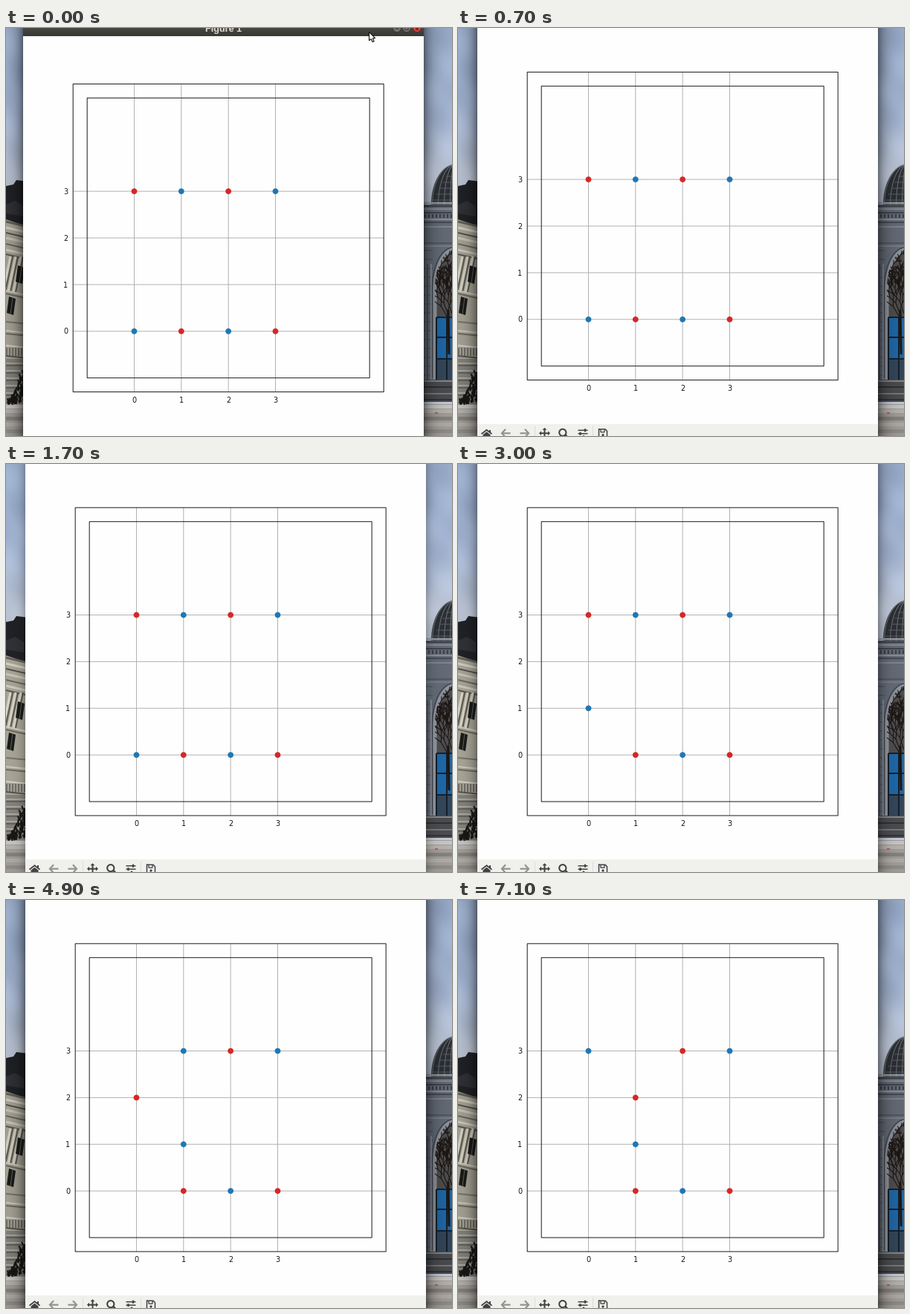
Recreate the animation shown at these times as a matplotlib script. Size 600x550 px, loop 8 s.

```python
import random

import numpy as np
import matplotlib.pyplot as plt
from matplotlib.animation import FuncAnimation
from matplotlib.collections import LineCollection
from matplotlib.patches import Circle, Polygon, Rectangle
from matplotlib.transforms import Affine2D

W, H, DPI = 600, 550, 100
STEP, LOOP = 100, 8000
PT = 72 / DPI
BLUE, RED = "#1f77b4", "#d62728"
X0, Y0, DX, DY = 175.5, 392.2, 63.33, 62.9
WIN_L, WIN_R = 26, 565

plt.rcParams["toolbar"] = "None"
fig = plt.figure(figsize=(W / DPI, H / DPI), dpi=DPI)
ax = fig.add_axes([0, 0, 1, 1])
ax.axis("off")
shift = Affine2D()
moving = shift + ax.transData


# ---- helpers -------------------------------------------------------------
def add(patch, z, win=False):
    patch.set_zorder(z)
    if win:
        patch.set_transform(moving)
    return ax.add_patch(patch)


def poly(pts, color, z=2, win=False):
    return add(Polygon(pts, fc=color, lw=0), z, win)


def rect(x, y, w, h, color, z=2, win=False):
    return add(Rectangle((x, y), w, h, fc=color, lw=0), z, win)


def stroke(pts, color, width=1.0, z=3, win=False):
    xs, ys = zip(*pts)
    line, = ax.plot(xs, ys, color=color, lw=width * PT, zorder=z,
                    solid_capstyle="butt", solid_joinstyle="miter", snap=False)
    if win:
        line.set_transform(moving)
    return line


def segments(lines, color, width):
    ax.add_collection(LineCollection(lines, colors=color, linewidths=width, zorder=4))


def label(x, y, s, size, **kw):
    return ax.text(x, y, s, fontsize=size * PT, va="baseline",
                   transform=moving, zorder=14, **kw)


def gx(u):
    return X0 + u * DX


def gy(v):
    return Y0 - v * DY


# ---- desktop picture -----------------------------------------------------
def sky():
    ys = np.arange(H)
    stops = [0, 60, 120, 200]
    cols = np.array([[156, 175, 205], [159, 178, 208], [168, 185, 214], [191, 200, 216]])
    grad = np.stack([np.interp(ys, stops, cols[:, c]) for c in range(3)], axis=1)
    xs = np.arange(W)[None, :]
    cloud = 5 * np.sin(ys[:, None] / 17 + xs / 14) + 3 * np.sin(ys[:, None] / 9 - xs / 11)
    img = (grad[:, None, :] + cloud[:, :, None]) / 255
    ax.imshow(img, extent=(0, W, H, 0), aspect="auto", zorder=0)


def left_building():
    poly([(0, 213), (10, 211), (14, 205), (30, 207), (30, 272), (0, 262)], "#202226")
    poly([(0, 238), (12, 233), (24, 240), (24, 254), (0, 250)], "#303236")
    poly([(0, 258), (30, 268), (30, 482), (0, 482)], "#a9a698")
    for y, c, w in ((261, "#63615a", 3), (269, "#d2cfc1", 3), (276, "#54524c", 2),
                    (283, "#c9c6b8", 3), (291, "#6a6860", 2), (299, "#cfccbe", 3),
                    (305, "#5a5851", 2)):
        stroke([(0, y), (30, y + 7)], c, w)
    for x in (2, 9, 16):
        stroke([(x + 4, 308), (x - 6, 356)], "#d9d6c7", 3.2)
        stroke([(x + 7, 308), (x - 3, 356)], "#5c5a53", 2)
    for y, c in ((354, "#d0cdbf"), (358, "#6b6961")):
        stroke([(0, y), (30, y + 7)], c, 2)
    for x, y in ((19, 333), (7, 375)):
        poly([(x - 3, y - 13), (x + 6, y - 10), (x + 3, y + 12), (x - 6, y + 9)], "#1a1c1b", 4)
        stroke([(x + 2, y - 12), (x - 1, y + 11)], "#66645c", 1, 5)
    for y, c in ((396, "#77756c"), (408, "#cfccbf"), (412, "#6d6b63"),
                 (428, "#d8d5ca"), (442, "#55534e")):
        stroke([(0, y), (30, y + 3)], c, 2)
    for x in range(1, 30, 4):
        stroke([(x, 431), (x, 442)], "#615f59", 1.5)
    rect(0, 446, 30, 62, "#85837c")
    for y in (452, 462, 472, 482, 492):
        stroke([(0, y), (30, y)], "#a9a7a0", 2)
        stroke([(0, y + 3), (30, y + 3)], "#5b5954", 1.5)
    rng = random.Random(4)
    twigs = []
    for _ in range(170):
        x, y = rng.uniform(2, 30), rng.uniform(466, 508)
        if x > 24 - (y - 465) * 0.5:
            twigs.append([(x, y), (x + rng.uniform(-4, 4), y - rng.uniform(3, 9))])
    segments(twigs, "#191817", 1.5)


def branch(out, rng, x, y, ang, length, depth):
    x2, y2 = x + length * np.cos(ang), y - length * np.sin(ang)
    out.append([(x, y), (x2, y2)])
    if depth:
        for turn in (-0.45, 0.42):
            branch(out, rng, x2, y2, ang + turn * rng.uniform(0.5, 1.3),
                   length * rng.uniform(0.7, 0.88), depth - 1)


def arc(cx, cy, rx, ry):
    a = np.linspace(np.pi, np.pi / 2, 16)
    return list(zip(cx + rx * np.cos(a), cy - ry * np.sin(a)))


def right_building():
    poly([*arc(604, 238, 32, 54), (604, 238)], "#2c3035")
    for k in (0.95, 0.7, 0.45, 0.2):
        stroke(arc(604, 238, 32 * k, 54), "#6d7278", 1)
    for y in (200, 208, 216, 224, 232):
        stroke([(592 - (y - 200) * 0.55, y), (600, y)], "#5b6066", 1)
    rect(560, 238, 40, 264, "#646b76")
    for y, c, w in ((236, "#9a9fa6", 2.5), (240, "#3a3f47", 2), (244, "#858b94", 2),
                    (249, "#3f454e", 2), (258, "#8a909a", 2), (262, "#454b55", 2),
                    (268, "#7f8690", 2), (290, "#4c525c", 1.5), (294, "#7c838d", 1.5)):
        stroke([(562, y), (600, y)], c, w)
    for x in range(564, 600, 5):
        stroke([(x, 251), (x, 256)], "#3a3f48", 2)
    for y in range(300, 475, 12):
        stroke([(562, y), (574, y)], "#4e545e", 1.2)
    for x, c in ((567, "#4b515b"), (572, "#858b95")):
        stroke([(x, 318), (x, 474)], c, 2)

    edge = [(577, 474), *arc(605, 352, 28, 54)]
    stroke(edge, "#8f959e", 5)
    stroke([(x - 3.5, y - 2) for x, y in edge], "#3c4148", 1.2)
    hall = poly([*edge, (605, 474)], "#4f4e4f")
    rect(579, 390, 21, 56, "#1f67a6")
    rect(579, 446, 21, 28, "#33475a")
    for y in (390, 417, 446):
        stroke([(579, y), (600, y)], "#16202a", 2)
    for x in (579, 593):
        stroke([(x, 390), (x, 474)], "#16202a", 2)
    twigs, rng = [], random.Random(9)
    for x, y, ang in ((595, 400, 1.65), (594, 390, 2.1), (600, 385, 1.9), (595, 360, 1.8)):
        branch(twigs, rng, x, y, ang, 17, 6)
    crown = LineCollection(twigs, colors="#1d1714", linewidths=0.8, zorder=4)
    ax.add_collection(crown)
    crown.set_clip_path(hall)
    stroke([(596, 440), (595, 380)], "#1d1714", 3, z=4)
    rect(560, 474, 40, 30, "#4b4c4f")
    for y, c in ((476, "#84868a"), (484, "#2f3032"), (493, "#77787b"), (501, "#333436")):
        stroke([(560, y), (600, y)], c, 2)


def ground():
    rect(0, 507, W, 43, "#a09c97")
    for y, c in ((508, "#c6c5c3"), (514, "#b5b2ae"), (524, "#85817d"),
                 (532, "#aeaaa5"), (541, "#8f8b86")):
        rect(0, y, W, 5, c)
    rect(577, 518, 4, 2, "#c25a55", z=3)


# ---- plot window ---------------------------------------------------------
def frame_box(lo, hi):
    add(Rectangle((gx(lo), gy(hi)), gx(hi) - gx(lo), gy(lo) - gy(hi), fc="none",
                  ec="#1a1a1a", lw=PT, snap=False), 12, True)


def plot_area():
    rect(WIN_L, -30, WIN_R - WIN_L, 620, "#fefefe", 10, True)
    for k in range(4):
        stroke([(gx(k), gy(-1.3)), (gx(k), gy(5.3))], "#b2b2b2", 1, 11, True)
        stroke([(gx(-1.3), gy(k)), (gx(5.3), gy(k))], "#b2b2b2", 1, 11, True)
        label(gx(k) - 0.2, 488.2, str(k), 9.6, ha="center", color="#111111")
        label(86.2, gy(k) + 3.6, str(k), 9.6, ha="right", color="#111111")
    frame_box(-1.3, 5.3)
    frame_box(-1, 5)


def title_bar():
    for i in range(14):
        g = 0.30 - 0.006 * i
        rect(WIN_L, -20 + i, WIN_R - WIN_L, 1.1, (g, g * 0.98, g * 0.91), 13, True)
    label(295.5, -11.5, "Figure 1", 12.6, ha="center", color="#dfdbd2",
          family="Liberation Sans", weight="bold")
    for x, c in ((529, "#77756d"), (542, "#77756d"), (556, "#e0443e")):
        add(Circle((x, -16.3), 5.3, fc=c, ec="#35342f", lw=0.6), 14, True)
    stroke([(526.5, -15.5), (531.5, -15.5)], "#3c3b37", 1.2, 15, True)
    stroke([(540, -17), (540, -14), (544, -14), (544, -17)], "#3c3b37", 1, 15, True)
    stroke([(554, -17), (558, -13.5)], "#6b1b17", 1.2, 15, True)
    stroke([(558, -17), (554, -13.5)], "#6b1b17", 1.2, 15, True)


def toolbar():
    dark, pale, y = "#3f4244", "#919394", 545.7

    def ink(pts, color=dark, width=2.0):
        stroke(pts, color, width, 15, True)

    rect(WIN_L, 533, WIN_R - WIN_L, 60, "#f0f0ec", 13, True)
    # home
    ink([(31.5, y + 1), (38.5, y - 4.5), (45.5, y + 1)], width=1.8)
    poly([(33.5, y + 2), (38.5, y - 2), (43.5, y + 2), (43.5, y + 7), (33.5, y + 7)],
         dark, 15, True)
    rect(42, y - 4.5, 2, 4, dark, 15, True)
    # back, forward
    for x, d in ((64, 1), (90, -1)):
        ink([(x, y - 5.5), (x - 5 * d, y), (x, y + 5.5)], pale, 2.2)
        ink([(x - 5 * d, y), (x + 6.5 * d, y)], pale, 2.2)
    for x in (103.5, 181.5):
        ink([(x, 536), (x, 560)], "#dcdcd8", 1)
    # pan
    ink([(111, y), (122, y)])
    ink([(116.5, y - 5), (116.5, y + 5)])
    for dx, dy in ((1, 0), (-1, 0), (0, 1), (0, -1)):
        cx, cy = 116.5 + 7.5 * dx, y + 7.5 * dy
        poly([(cx, cy), (cx - 3 * dx + 3 * dy, cy - 3 * dy + 3 * dx),
              (cx - 3 * dx - 3 * dy, cy - 3 * dy - 3 * dx)], dark, 15, True)
    # zoom
    add(Circle((140.8, y - 1), 4.6, fc="none", ec=dark, lw=2 * PT), 15, True)
    ink([(144, y + 2), (148, y + 6)], width=2.6)
    # sliders
    for dy, kx in ((-4, 171), (0.5, 164.5), (5, 169)):
        ink([(161.5, y + dy), (174.5, y + dy)], width=1.5)
        ink([(kx, y + dy - 2), (kx, y + dy + 2)], width=2.4)
    # save
    ink([(189.5, y - 5.5), (198, y - 5.5), (200.5, y - 3), (200.5, y + 6),
         (189.5, y + 6), (189.5, y - 6.2)], width=1.5)
    ink([(192, y - 5), (192, y - 1.5), (197, y - 1.5), (197, y - 5)], width=1.3)
    add(Circle((195, y + 2.4), 1.6, fc=dark, lw=0), 15, True)


sky()
left_building()
right_building()
ground()
shade = ax.imshow(np.zeros((1, W, 4)), extent=(0, W, H, 0), aspect="auto",
                  interpolation="nearest", zorder=9)
plot_area()
title_bar()
toolbar()

# each dot: colour, then (time, column, row) stops
DOTS = [
    (BLUE, [(0, 0, 0), (3000, 0, 1), (4600, 1, 1)]),
    (RED, [(0, 1, 0)]),
    (BLUE, [(0, 2, 0)]),
    (RED, [(0, 3, 0)]),
    (RED, [(0, 0, 3), (4800, 0, 2), (6900, 1, 2)]),
    (BLUE, [(0, 1, 3), (7100, 0, 3)]),
    (RED, [(0, 2, 3)]),
    (BLUE, [(0, 3, 3)]),
]
dots = [add(Circle((0, 0), 3.9, fc=c, lw=0), 13, True) for c, _ in DOTS]

POINTER = np.array([(0, 0), (0, 11.5), (2.7, 9.2), (4.6, 13.3), (6.6, 12.4),
                    (4.8, 8.4), (8.2, 8.2)])
cursor = add(Polygon(POINTER, fc="white", ec="#111111", lw=0.8), 20)

WINDOW = [(0, -3, 16.6), (700, 0, 0.6), (900, 0, 0)]
MOUSE = [(0, 488.5, 5.5), (100, 482.5, 5.5), (300, 477.5, 2.5)]
FOCUS_T = [1500, 1700, 2900, 3100, 4200, 4400, 4500, 4700]
FOCUS_V = [1, 0, 0, 1, 1, 0, 0, 1]


def at(stops, t):
    return [s for s in stops if s[0] <= t][-1][1:]


def draw_shade(dx, focus):
    x = np.arange(W) + 0.5
    gap = np.maximum(np.maximum(WIN_L + dx - x, x - WIN_R - dx), 0)
    rgba = np.zeros((1, W, 4))
    rgba[0, :, 3] = (0.26 + 0.24 * focus) * np.exp(-gap / (7 + 3 * focus))
    shade.set_data(rgba)


def update(i):
    t = i * STEP
    dx, dy = at(WINDOW, t)
    shift.clear().translate(dx, dy)
    draw_shade(dx, np.interp(t, FOCUS_T, FOCUS_V))
    for dot, (_, stops) in zip(dots, DOTS):
        u, v = at(stops, t)
        dot.center = gx(u), gy(v)
    cursor.set_visible(t < 700)
    cursor.set_xy(POINTER + at(MOUSE, t))
    return []


ax.set_xlim(0, W)
ax.set_ylim(H, 0)
anim = FuncAnimation(fig, update, frames=LOOP // STEP, interval=STEP,
                     init_func=lambda: update(0), repeat=True, repeat_delay=0)
plt.show()
```
